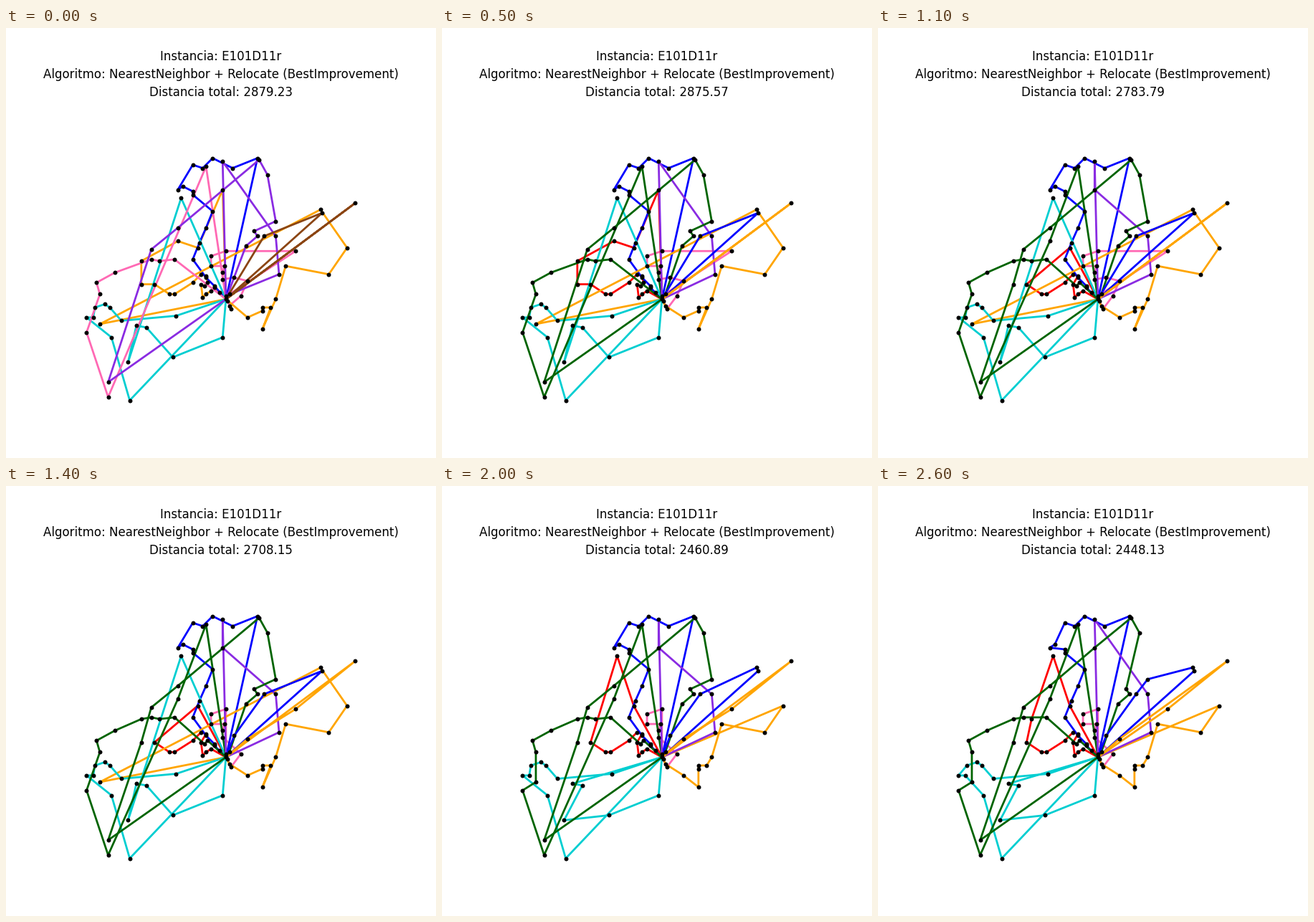
Write a matplotlib script that moves like this. It is 600 px wide and 600 px high and loops after 2.7 s.

```python
import matplotlib.pyplot as plt
import numpy as np
from matplotlib.animation import FuncAnimation

SIZE, DPI, STEP_MS = 600, 100, 100
UNIT = 2.315                      # pixels per map unit
ORIGIN = np.array([306.9, 378.4])  # depot on the stage
DEPOT = (0, 0)
FIRST_COST, LAST_COST = 2879.23, 2448.13


def run(a, b, n):
    """n evenly spaced stops from a to b."""
    return [tuple(p) for p in np.linspace(a, b, n).round().astype(int).tolist()]


# Stops of each route in visiting order, in map units from the depot.
START = dict(
    inner=[(2, -3), (42, -29), (0, -29), (-9, -26), (-9, -20),
           *run((-1, -20), (-2, -12), 3), (5, -13), (13, -11), (9, -2),
           (2, 4), (3, 6), (1, 1)],
    west=[(-4, -4), *run((-7, -7), (-14, -1), 4), (-15, -9), (-13, -8),
          (-11, -10), (-12, -14), (-15, -15), (-20, -10), (-31, -3), (-34, -3),
          (-43, -9), (-51, -9), (-51, -23), (-29, -35), (-17, -31), (-2, -66)],
    north=[(-7, -8), (-12, -13), *run((-20, -24), (-8, -53), 4), (-20, -63),
           (-20, -65), (-26, -68), (-29, -66), (-20, -81), (-14, -79),
           (-8, -85), (4, -79), (19, -85)],
    east=[(13, 11), (22, 7), (22, 5), (27, 5), (22, 18), (30, 0), (36, -20),
          (62, -15), (73, -31), (57, -54), (-76, 15)],
    south=[(-30, 10), (-63, 13), (-70, 5), (-73, 3), (-79, 5), (-80, 11),
           (-84, 11), (-69, 23), (-58, 61)],
    valley=[(-2, 23), (-32, 35), (-48, 17), (-54, 16), (-59, 38), (-27, -61)],
    outer=[(-31, -24), (-40, -23), (-45, -24), (-67, -16), (-78, -10),
           (-76, -3), (-84, 20), (-71, 59), (-12, -80)],
    spire=[(0, -2), (32, -15), (30, -38), (-2, -83)],
    arc=[(12, -32), (19, -38), (17, -41), (30, -47), (25, -75), (20, -84),
         (-29, -43), (-45, -30), (-71, 50)],
    ridge=[(23, -38), (58, -52)],
    far=[(78, -58)],
)

# Route colours before and after the first relocation.
FIRST = dict(inner="hotpink", west="orange", north="blue", east="orange",
             south="darkturquoise", valley="darkturquoise", outer="hotpink",
             spire="blueviolet", arc="blueviolet", ridge="saddlebrown",
             far="saddlebrown")
LATER = dict(FIRST, west="red", outer="darkgreen", arc="darkgreen",
             ridge="blue", far="orange")

# Each step takes one stop (giving route, position) to a receiving route.
MOVES = [
    ("west", 0, "north"), ("inner", 0, "arc"), ("spire", 0, "inner"),
    ("inner", 11, "east"), ("west", 0, "north"), ("west", 4, "outer"),
    ("west", 4, "outer"), ("west", 11, "outer"), ("west", 10, "arc"),
    ("west", -1, "spire"), ("west", -2, "outer"), ("inner", 9, "far"),
    ("inner", 1, "far"), ("inner", 7, "ridge"), ("east", -1, "outer"),
    ("east", -1, "ridge"), ("east", 5, "east"), ("inner", -1, "east"),
    ("valley", -1, "west"), ("valley", -1, "valley"), ("arc", 4, "ridge"),
    ("spire", 2, "arc"), ("south", 5, "south"), ("north", 10, "north"),
    ("far", -1, "far"), ("outer", 3, "west"),
]


def closed(path):
    return np.array([DEPOT, *path, DEPOT], dtype=float)


def length(path):
    return np.hypot(*np.diff(closed(path), axis=0).T).sum()


def relocate(routes, source, k, target):
    """Take stop k out of source and put it where target grows least."""
    new = {name: list(path) for name, path in routes.items()}
    stop = new[source].pop(k)
    path = new[target]
    options = [path[:i] + [stop] + path[i:] for i in range(len(path))]
    new[target] = min(options, key=length)
    return new


states = [START]
for move in MOVES:
    states.append(relocate(states[-1], *move))

lengths = np.array([sum(map(length, s.values())) for s in states])
progress = (lengths[0] - lengths) / (lengths[0] - lengths[-1])
costs = FIRST_COST + (LAST_COST - FIRST_COST) * progress

fig = plt.figure(figsize=(SIZE / DPI, SIZE / DPI), dpi=DPI, facecolor="white")
ax = fig.add_axes([0, 0, 1, 1])
ax.set_xlim(0, SIZE)
ax.set_ylim(SIZE, 0)
ax.axis("off")


def caption(row, text=""):
    return ax.text(SIZE / 2, 45 + 25 * row, text, ha="center", va="baseline",
                   fontsize=12, family="DejaVu Sans", color="black")


def on_stage(points):
    return (ORIGIN + UNIT * points).T


caption(0, "Instancia: E101D11r")
caption(1, "Algoritmo: NearestNeighbor + Relocate (BestImprovement)")
total = caption(2)

lines = {name: ax.plot([], [], lw=2, zorder=2)[0] for name in START}
stops = np.vstack([closed(path) for path in START.values()])
ax.plot(*on_stage(np.unique(stops, axis=0)), "o", color="black", ms=4.3, mew=0,
        zorder=3)


def draw(i):
    colours = LATER if i else FIRST
    for name, line in lines.items():
        line.set_data(*on_stage(closed(states[i][name])))
        line.set_color(colours[name])
    total.set_text(f"Distancia total: {round(float(costs[i]), 2)}")
    return [*lines.values(), total]


anim = FuncAnimation(fig, draw, frames=len(states), interval=STEP_MS,
                     repeat=True, repeat_delay=0, blit=False)
plt.show()
```
